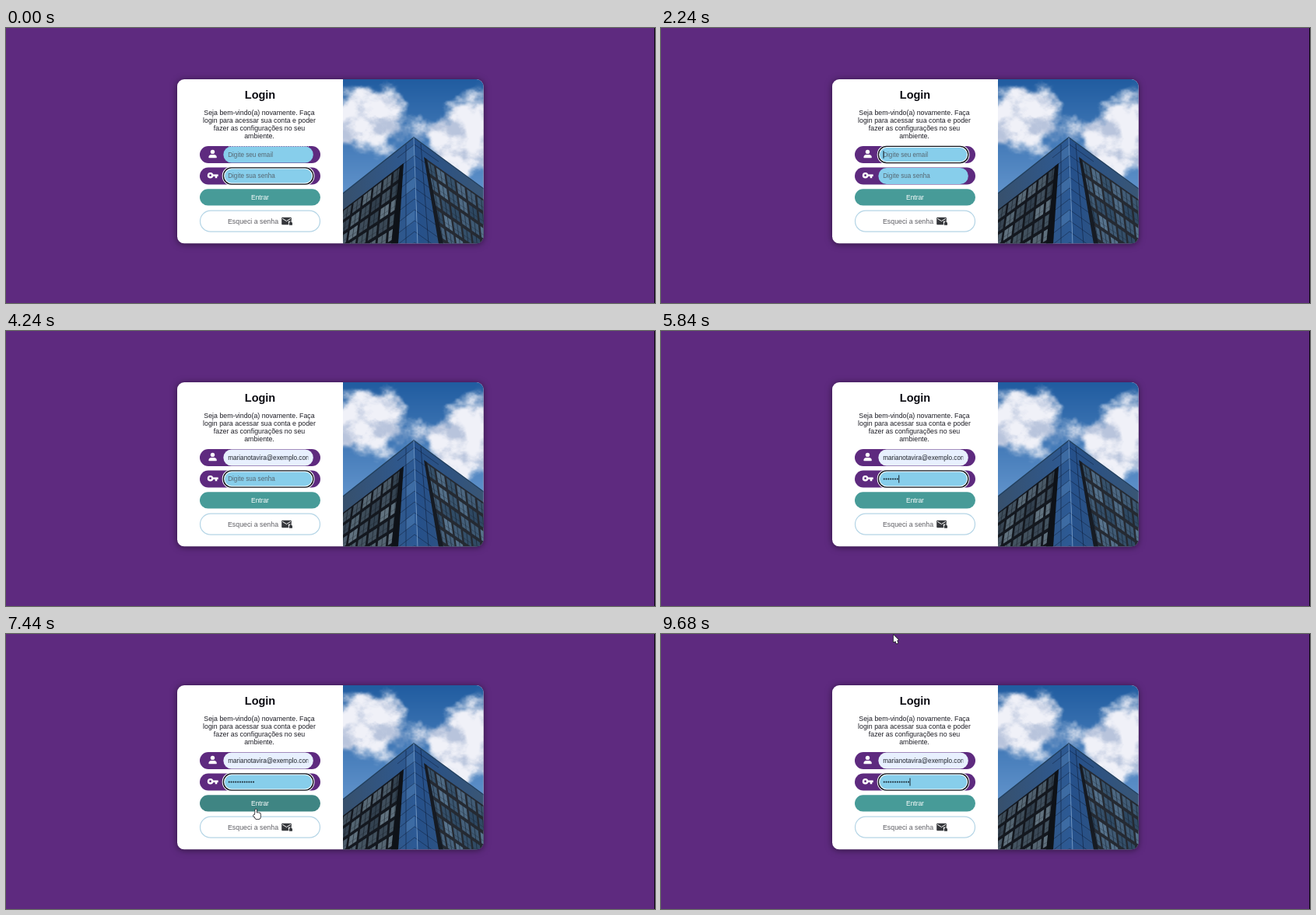
An HTML page with a canvas that plays this animation: 834x354 px, repeating every 9760 ms.

```html
<!DOCTYPE html>
<html lang="pt">
<head>
<meta charset="utf-8">
<title>Login</title>
<style>
html, body { margin: 0; width: 100%; height: 100%; overflow: hidden; background: #5e2a7f; }
canvas { display: block; }
</style>
</head>
<body>
<canvas id="stage" width="834" height="354"></canvas>
<script>
const W = 834, H = 354, LOOP = 9760, STEP = 80, BLINK = 565;
const PURPLE = '#5e2a7f', SKY = '#87ceeb', TEAL = '#479b98', TEAL_HOVER = '#3f8583';
const INK = '#36383c', HINT = '#566670';
const FONT = '"Liberation Sans", Arial, sans-serif';
const EMAIL = 'marianotavira@exemplo.com';
const ctx = document.getElementById('stage').getContext('2d');

// Moments of the story, in ms
const FOCUS_EMAIL = 1760, AUTOFILL = 3280, FOCUS_PASS = 3680;
const TYPE_START = 5360, TYPE_END = 6080, HOVER = 6640, LEAVE = 8960;

const lerp = (a, b, k) => a + (b - a) * k;
const clamp = k => Math.min(1, Math.max(0, k));
const smooth = (a, b, x) => { const k = clamp((x - a) / (b - a)); return k * k * (3 - 2 * k); };
const mix = (a, b, k) => a.map((v, i) => lerp(v, b[i], k));
const rgb = c => `rgb(${c.map(Math.round)})`;

function pill(g, x, y, w, h, r, fill) {
  g.beginPath();
  g.roundRect(x, y, w, h, r);
  if (fill) { g.fillStyle = fill; g.fill(); }
}

function line(g, color, width, ...pts) {
  g.strokeStyle = color;
  g.lineWidth = width;
  g.beginPath();
  pts.forEach(p => g.lineTo(...p));
  g.stroke();
}

function poly(g, fill, ...pts) {
  g.beginPath();
  pts.forEach(p => g.lineTo(...p));
  g.closePath();
  g.fillStyle = fill;
  g.fill();
}

function disc(g, x, y, r, fill) {
  pill(g, x - r, y - r, 2 * r, 2 * r, r, fill);
}

function label(g, str, x, y, size, color, align = 'left', weight = '') {
  g.font = `${weight} ${size}px ${FONT}`;
  g.textAlign = align;
  g.fillStyle = color;
  g.fillText(str, x, y);
}

// ---- photo panel ----
const hash = (x, y) => { const s = Math.sin(x * 127.1 + y * 311.7) * 43758.5453; return s - Math.floor(s); };

function noise(x, y) {
  const i = Math.floor(x), j = Math.floor(y);
  const u = smooth(0, 1, x - i), v = smooth(0, 1, y - j);
  return lerp(lerp(hash(i, j), hash(i + 1, j), u), lerp(hash(i, j + 1), hash(i + 1, j + 1), u), v);
}

function fbm(x, y) {
  let sum = 0;
  for (let o = 0; o < 5; o++) sum += noise(x * 2 ** o, y * 2 ** o) / 2 ** (o + 1);
  return sum;
}

const bump = (x, y, cx, cy, rx, ry) => Math.exp(-(((x - cx) / rx) ** 2) - ((y - cy) / ry) ** 2);

function sky(g) {
  for (let y = 66; y < 216; y++) for (let x = 433; x < 614; x++) {
    const blue = mix([32, 92, 160], [98, 148, 204], (y - 66) / 150);
    const mass = Math.max(bump(x, y, 462, 122, 64, 44), bump(x, y, 600, 138, 50, 52));
    const n = fbm(x / 38, y / 32);
    const white = mix([184, 196, 220], [240, 241, 248], smooth(0.25, 0.6, fbm(x / 24 + 9, y / 18)));
    const cover = smooth(0.3, 0.72, mass + (n - 0.48) * 1.3);
    g.fillStyle = rgb(mix(blue, white, cover));
    g.fillRect(x, y, 1, 1);
  }
}

// Grid of windows in a perspective quad
function facade(g, [tl, tr, br, bl], count, wall, dark, light) {
  const at = (c, r) => mix(mix(tl, tr, c / count), mix(bl, br, c / count), r / count);
  poly(g, wall, tl, tr, br, bl);
  for (let c = 0; c < count; c++) for (let r = 0; r < count; r++) {
    const tone = hash(c + 3, r + tl[0]);
    poly(g, rgb(mix(dark, light, tone)),
      at(c + 0.1, r + 0.12), at(c + 0.88, r + 0.12), at(c + 0.88, r + 0.86), at(c + 0.1, r + 0.86));
    line(g, 'rgba(16,22,30,.7)', 0.7, at(c + 0.5, r + 0.1), at(c + 0.5, r + 0.88));
    line(g, 'rgba(16,22,30,.5)', 0.5, at(c + 0.1, r + 0.6), at(c + 0.88, r + 0.6));
  }
}

function wall(g, from, to, fromX, toX, ...pts) {
  const grad = g.createLinearGradient(fromX, 0, toX, 0);
  grad.addColorStop(0, from);
  grad.addColorStop(1, to);
  poly(g, grad, ...pts);
}

function building(g) {
  const apex = [524, 141], foot = [529, 278], west = [433, 213], east = [614, 207];
  wall(g, '#37506c', '#2c5a96', 433, 529, apex, foot, [433, 278], west);
  wall(g, '#24508c', '#3a5674', 524, 614, apex, east, [614, 278], foot);
  for (let i = 0; i < 10; i++) {
    const y = 150 + i * 14;
    line(g, 'rgba(14,28,54,.6)', 0.8, [503, y + 17], [525, y], [556, y + 22]);
    if (i % 3 == 0) poly(g, 'rgba(110,160,212,.25)', [514, y + 9], [525, y], [525, y + 14], [514, y + 23]);
  }
  line(g, 'rgba(14,28,54,.7)', 0.8, [514, 150], [514, 278]);
  line(g, 'rgba(14,28,54,.7)', 0.8, [533, 149], [543, 278]);

  facade(g, [[433, 234], [510, 175], [502, 290], [416, 338]], 6, '#14181f', [44, 58, 72], [98, 115, 128]);
  facade(g, [[538, 167], [617, 223], [628, 336], [559, 290]], 6, '#252a32', [46, 72, 98], [88, 116, 142]);
  poly(g, '#0e1218', [511, 174], [506, 178], [495, 278], [504, 278]);
  poly(g, '#161b23', [537, 166], [541, 169], [562, 278], [556, 278]);

  line(g, '#22405f', 1.4, west, apex, east);
  line(g, '#7199c4', 0.8, apex, foot);
}

// ---- icons ----
function person(g) {
  disc(g, 265.5, 159.4, 2.7, '#fff');
  pill(g, 260.4, 163, 10.4, 4.2, [4, 4, 0.5, 0.5], '#fff');
}

function key(g) {
  disc(g, 262.6, 189.7, 3.8, '#fff');
  disc(g, 262.6, 189.7, 1.4, PURPLE);
  pill(g, 265.5, 188.4, 7.2, 2.6, 0, '#fff');
  pill(g, 268.7, 190, 2.6, 3.2, 0, '#fff');
}

function mail(g) {
  pill(g, 354.2, 243.8, 12.6, 9.4, 1, INK);
  line(g, '#fff', 1, [355.2, 245.3], [360.5, 248.6], [365.8, 245.3]);
  pill(g, 362.9, 248.7, 6, 6, 0, '#fff');
  disc(g, 365.9, 250.6, 1.5, INK);
  pill(g, 363.8, 250.6, 4.2, 3.2, 0.5, INK);
}

// Everything that never changes is painted once
function paintBase() {
  const c = document.createElement('canvas');
  c.width = W; c.height = H;
  const g = c.getContext('2d');
  g.fillStyle = PURPLE;
  g.fillRect(0, 0, W, H);
  g.fillStyle = '#0a040e';
  g.fillRect(W - 1, 0, 1, H);

  g.save();
  g.shadowColor = 'rgba(0,0,0,.5)';
  g.shadowBlur = 8;
  g.shadowOffsetY = 1;
  pill(g, 220, 66, 393.5, 211.3, 9, '#fff');
  g.restore();
  g.save();
  pill(g, 220, 66, 393.5, 211.3, 9);
  g.clip();
  g.beginPath();
  g.rect(433, 66, 181, 212);
  g.clip();
  sky(g);
  building(g);
  g.restore();

  label(g, 'Login', 326.5, 91, 14.5, '#0b0b12', 'center', 'bold');
  ['Seja bem-vindo(a) novamente. Faça', 'login para acessar sua conta e poder',
   'fazer as configurações no seu', 'ambiente.']
    .forEach((s, i) => label(g, s, 325.5, 112.2 + i * 9.8, 8.8, '#1d1d25', 'center'));

  for (const y of [152, 179.5]) pill(g, 249, y, 155, 22, 11, PURPLE);
  person(g);
  key(g);
  pill(g, 249.5, 235.2, 154, 27, 13.5, '#fff');
  g.strokeStyle = '#b5d5e6';
  g.lineWidth = 1.2;
  g.stroke();
  label(g, 'Esqueci a senha', 285, 251.8, 8.8, '#5e5e64');
  mail(g);
  return c;
}

// ---- live parts ----
function field(y, fill, focused) {
  pill(ctx, 279.4, y + 0.4, 115.4, 21.2, 10.4, fill);
  if (!focused) return;
  for (const [color, width] of [['#fff', 3.4], ['#10141c', 1.4]]) {
    ctx.strokeStyle = color;
    ctx.lineWidth = width;
    ctx.stroke();
  }
}

function caret(t, since, x, y) {
  const beats = Math.floor(Math.max(0, t - since) / BLINK);
  if (beats % 2) return;
  ctx.fillStyle = '#15202a';
  ctx.fillRect(x, y, 1, 10);
}

function dotCount(t) {
  if (t < TYPE_START) return 0;
  return 1 + Math.round(11 * clamp((t - TYPE_START) / (TYPE_END - TYPE_START)) ** 1.5);
}

// Dark silhouette first, then the white inside
function cursor(x, y, shape) {
  ctx.save();
  ctx.translate(x, y);
  ctx.lineJoin = 'round';
  ctx.lineWidth = 1.6;
  ctx.strokeStyle = '#1c1c22';
  shape(() => ctx.stroke());
  shape(() => {});
  ctx.restore();
}

const arrow = (x, y) => cursor(x, y, edge => {
  poly(ctx, '#fff', [2, 6], [4, 6], [6, 11], [4, 11.6]);
  edge();
  poly(ctx, '#fff', [0.4, 0.6], [0.4, 9.6], [6.6, 7]);
  edge();
});

const hand = (x, y) => cursor(x, y, edge => {
  pill(ctx, -1, 0.4, 1.8, 9, 0.9, '#fff');
  edge();
  pill(ctx, -3.2, 7.6, 3, 2.4, 1, '#fff');
  edge();
  pill(ctx, -1.4, 5, 7, 8, [1, 2, 3, 3], '#fff');
  edge();
});

function pointer(t) {
  if (t >= LEAVE) {
    const k = smooth(LEAVE, 9680, t);
    const x = lerp(321.3, 298.5, k), y = lerp(225.2, 0.6, k);
    if (y > 207) hand(x, y);
    else if (y < 151) arrow(x, y);
  } else if (t >= HOVER) {
    const k = smooth(HOVER, 7440, t);
    hand(lerp(332, 321.3, k), lerp(208, 225.2, k));
  } else if (t >= 160) {
    const k = smooth(160, 1040, t);
    const x = lerp(694, 340, k);
    if (x > 404) arrow(x, lerp(222, 164, k));
  }
}

const base = paintBase();

function draw(t) {
  const onEmail = t >= FOCUS_EMAIL && t < FOCUS_PASS;
  const filled = t >= AUTOFILL;
  const dots = dotCount(t);
  ctx.drawImage(base, 0, 0);

  field(152, filled ? '#e8f0fe' : SKY, onEmail);
  if (t < FOCUS_EMAIL) {
    ctx.setLineDash([1.5, 1.5]);
    line(ctx, 'rgba(255,255,255,.7)', 0.9, [286, 152.4], [389, 152.4]);
    ctx.setLineDash([]);
  }
  ctx.save();
  ctx.beginPath();
  ctx.rect(285, 153, 103.3, 20);
  ctx.clip();
  if (filled) label(ctx, EMAIL, 285.2, 165.9, 8.2, '#20242c');
  else label(ctx, 'Digite seu email', 285.2, 165.9, 8.15, HINT);
  ctx.restore();

  field(179.5, SKY, !onEmail);
  if (!dots) label(ctx, 'Digite sua senha', 285.2, 193.4, 8.15, HINT);
  for (let i = 0; i < dots; i++) disc(ctx, 286.7 + i * 2.85, 190.6, 1, '#17222c');

  if (onEmail && !filled) caret(t, FOCUS_EMAIL - 5, 285.5, 158);
  if (t >= FOCUS_PASS) caret(t, dots ? 5735 : FOCUS_PASS - 10, 285.3 + dots * 2.85, 185.5);

  const hover = t >= HOVER && t < LEAVE + 240;
  pill(ctx, 249, 207.3, 155, 21.3, 10.6, hover ? TEAL_HOVER : TEAL);
  label(ctx, 'Entrar', 326.5, 220.9, 8.4, '#fff', 'center');
  pointer(t);
}

function tick(now) {
  const t = now % LOOP;
  draw(t - t % STEP);
  requestAnimationFrame(tick);
}
requestAnimationFrame(tick);
</script>
</body>
</html>
```
